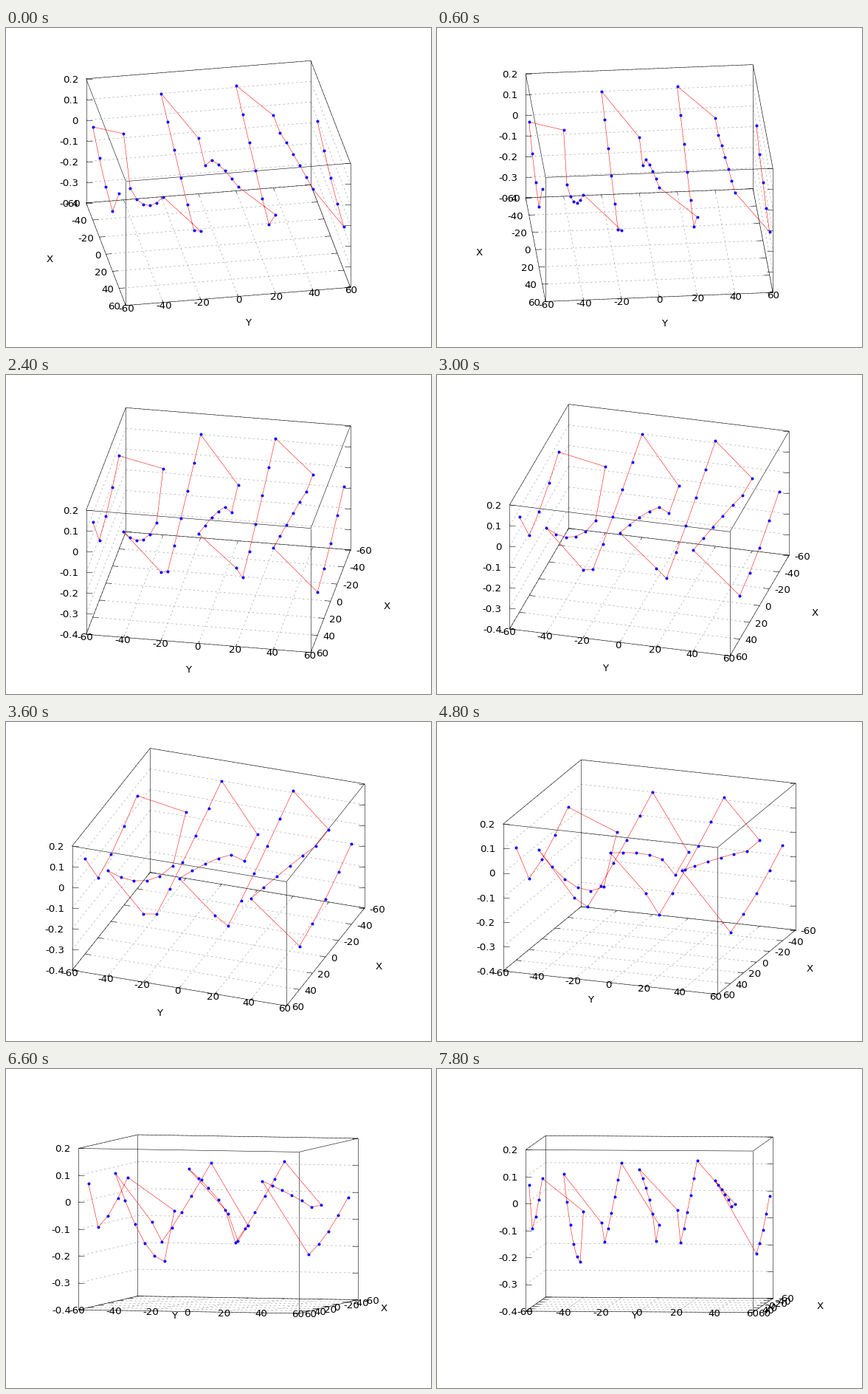
Animation, 576 px wide and 432 px high, one loop 8 s. Source, as a matplotlib script:

```python
import numpy as np
import matplotlib.pyplot as plt
from matplotlib.animation import FuncAnimation
from matplotlib.collections import LineCollection

W, H = 576, 432
CX, CY = 287.7, 210.0      # centre of the box on screen
SX, SY = 154.6, 109.7      # half box size in pixels
TICK, GAP = 8, 7.3         # tick length and label distance
FONT = 13.33
DROP = 0.365 * FONT        # from text middle to baseline

FLOOR, CEIL = -0.4, 0.2
XY_TICKS = range(-60, 61, 20)
Z_TICKS = [k / 10 for k in range(-4, 3)]

# Each sweep along X starts at one height, drops, then climbs: (start, low, high, bend)
SWEEPS = [
    (0.06, -0.11, 0.05, 1.4),
    (-0.08, -0.26, 0.11, 1.6),
    (-0.07, -0.15, 0.10, 1.1),
    (-0.13, -0.18, 0.13, 0.65),
    (-0.02, -0.15, 0.11, 1.1),
    (-0.05, -0.05, 0.09, 0.9),
    (-0.19, -0.16, -0.01, 1.2),
]


def sweep(i, start, low, high, bend):
    """Points of one column; even columns run backwards, outer ones are shorter."""
    reach, n = (40, 5) if i in (0, 6) else (60, 7)
    xs = np.linspace(-reach, reach, n) * (1 if i % 2 else -1)
    climb = low + (high - low) * np.linspace(0, 1, n - 1) ** bend
    return [(x, -60 + 20 * i, z) for x, z in zip(xs, [start, *climb])]


POINTS = [p for i, s in enumerate(SWEEPS) for p in sweep(i, *s)]


def view(step):
    """Tilt and turn in degrees: turn right, tilt down, turn back."""
    tilt = 50 if step <= 6 else min(55 + 10 * (step - 7), 85)
    turn = 80 + 5 * min(step, 6) - 5 * max(step - 10, 0)
    return tilt, turn


class Camera:
    def __init__(self, tilt, turn):
        a, t = np.radians(tilt), np.radians(turn - 90)
        self.ux = np.array([-np.sin(t) * SX, np.cos(t) * np.cos(a) * SY])
        self.uy = np.array([np.cos(t) * SX, np.sin(t) * np.cos(a) * SY])
        self.uz = np.array([0, -np.sin(a) * SY])

    def __call__(self, x, y, z):
        h = (z - FLOOR) / (CEIL - FLOOR) * 2 - 1
        return (np.array([CX, CY]) + x / 60 * self.ux
                + y / 60 * self.uy + h * self.uz)


fig = plt.figure(figsize=(W / 72, H / 72), dpi=72, facecolor="white")
ax = fig.add_axes([0, 0, 1, 1])
ax.set_xlim(0, W)
ax.set_ylim(H, 0)
ax.axis("off")

grid = LineCollection([], colors="#a8a8a8", linewidths=0.7,
                      linestyles=[(0, (3.5, 5))], zorder=1)
frame = LineCollection([], colors="black", linewidths=0.55, zorder=2)
ax.add_collection(grid, autolim=False)
ax.add_collection(frame, autolim=False)
curve, = ax.plot([], [], color="red", lw=0.52, zorder=3)
dots = ax.scatter([], [], s=16, color="blue", linewidths=0, zorder=4)


def label(text, ha):
    return ax.text(0, 0, text, ha=ha, va="baseline", fontsize=FONT,
                   family="DejaVu Sans", color="black", zorder=5)


x_labels = [label(str(v), "left") for v in XY_TICKS]
y_labels = [label(str(v), "center") for v in XY_TICKS]
z_labels = [label(f"{v:g}", "right") for v in Z_TICKS]
x_name, y_name = label("X", "center"), label("Y", "center")


def place(text, pos):
    text.set_position((pos[0], pos[1] + DROP))


def draw(i):
    cam = Camera(*view(i // 3))
    lines, dashed = [], []

    # box edges
    ring = [(-60, -60), (-60, 60), (60, 60), (60, -60)]
    for a, b in zip(ring, ring[1:] + ring[:1]):
        lines += [[cam(*a, FLOOR), cam(*b, FLOOR)],
                  [cam(*a, CEIL), cam(*b, CEIL)],
                  [cam(*a, FLOOR), cam(*a, CEIL)]]

    # the labelled edges depend on which side faces the viewer
    if cam.ux[0] > 1e-6:
        side, left, back, right = -1, (-60, -60), (-60, 60), (60, 60)
    else:
        side, left, back, right = 1, (60, -60), (-60, -60), (-60, 60)
    out_x = side * cam.uy / SX
    out_y = cam.ux / SX

    def floor_tick(near, far, out, text):
        dashed.append([near, far])
        lines.extend([[near, near - TICK * out], [far, far + TICK * out]])
        place(text, near + GAP * out)

    for v, xt, yt in zip(XY_TICKS, x_labels, y_labels):
        xt.set_ha("right" if side < 0 else "left")
        floor_tick(cam(v, 60 * side, FLOOR), cam(v, -60 * side, FLOOR), out_x, xt)
        floor_tick(cam(60, v, FLOOR), cam(-60, v, FLOOR), out_y, yt)

    for v, zt in zip(Z_TICKS, z_labels):
        p, q, r = cam(*left, v), cam(*back, v), cam(*right, v)
        dashed += [[p, q], [q, r]]
        lines += [[p, p + (TICK, 0)], [r, r - (TICK, 0)]]
        place(zt, p - (10.6, 0))

    place(x_name, cam(0, 60 * side, FLOOR) + side * cam.uy / 2)
    place(y_name, cam(60, 0, FLOOR) + cam.ux / 2)

    grid.set_segments(dashed)
    frame.set_segments(lines)
    path = np.array([cam(*p) for p in POINTS])
    curve.set_data(path[:, 0], path[:, 1])
    dots.set_offsets(path)
    return []


anim = FuncAnimation(fig, draw, frames=40, interval=200, repeat=True,
                     repeat_delay=0, blit=False)
plt.show()
```
